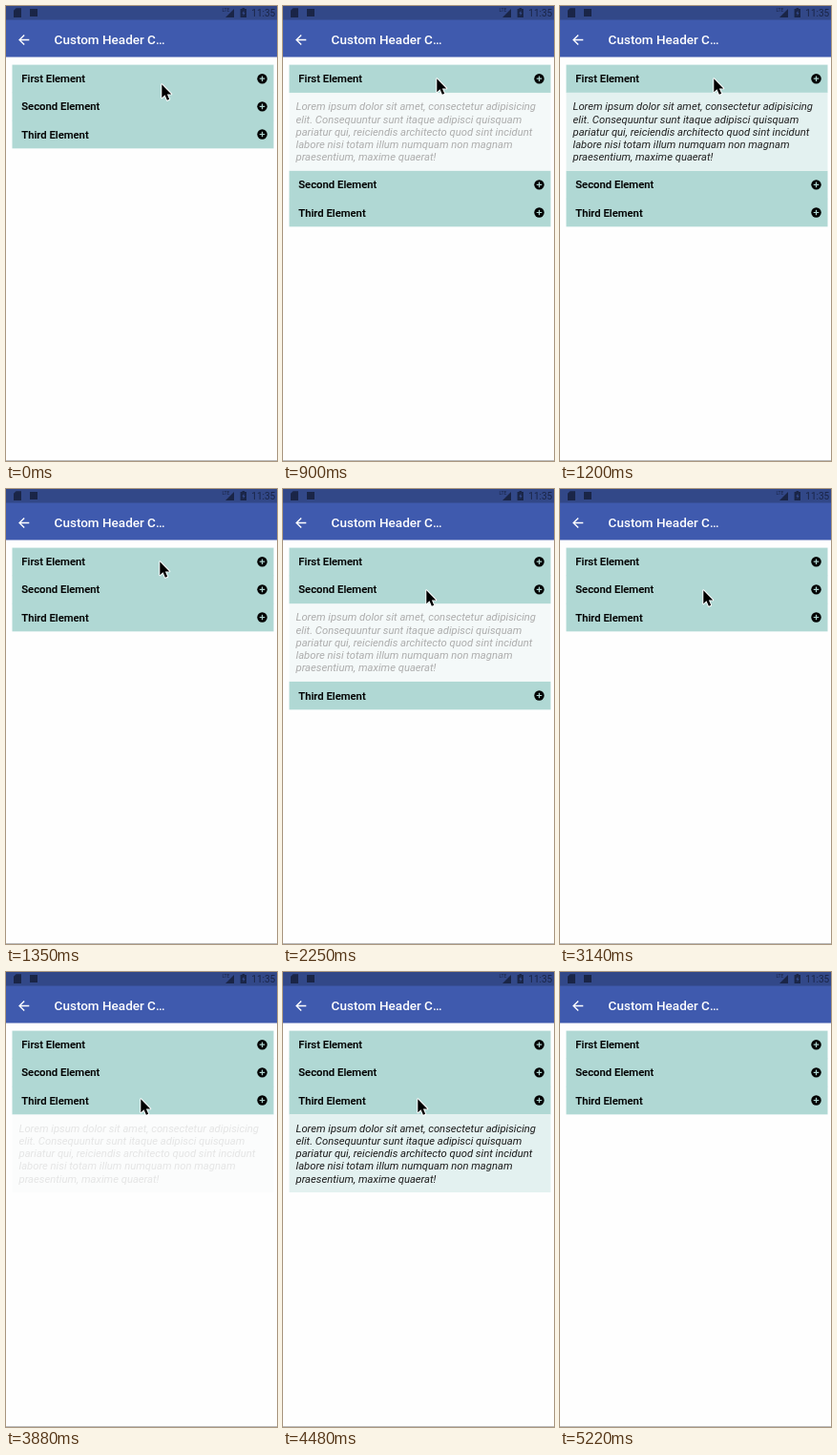
Animation, 284 px wide and 477 px high, one loop 6.41 s. Source, as an HTML page:

```html
<!DOCTYPE html>
<html lang="en">
<head>
<meta charset="utf-8">
<title>Accordion with custom header</title>
<style>
  html, body { margin: 0; width: 100%; height: 100%; overflow: hidden; background: #fefefe; }
  svg { display: block; width: 284px; height: 477px; font-family: Roboto, sans-serif; }
  .title { font-size: 13.5px; font-weight: 500; fill: #fff; }
  .label { font-size: 11.3px; font-weight: 500; stroke: #000; stroke-width: .15px; }
  .body { font-size: 11.25px; font-style: italic; fill: #1c1c1c; }
  .status { fill: #1a2547; }
</style>
</head>
<body>
<svg viewBox="0 0 284 477">
  <rect width="284" height="477" fill="#fefefe"/>
  <rect y="476" width="284" height="1" fill="#bdbdbd"/>
  <rect width="284" height="53.5" fill="#3f5aae"/>
  <rect width="284" height="14.5" fill="#324888"/>

  <g class="status">
    <path d="M10.6 2.2H16V12H8V4.8z"/>
    <rect x="25" y="3" width="8" height="8"/>
    <text x="226.5" y="6" font-size="5">LTE</text>
    <path d="M239 3v9h-9z"/>
    <path d="M247.5 2h2.6v1.1H252V12h-6.4V3.1h1.900z"/>
    <path d="M249.400 4.500l-2 3.500h1.200v2.600l2-3.600h-1.200z" fill="#324888"/>
    <text x="257.300" y="11" font-size="10">11:35</text>
  </g>

  <path transform="translate(10.300 27.100) scale(.7)" fill="#fff"
    d="M20 11H7.830l5.590-5.590L12 4l-8 8 8 8 1.410-1.410L7.830 13H20z"/>
  <text class="title" x="50.600" y="39.900">Custom Header C…</text>

  <g id="rows"></g>
  <g id="panel">
    <rect x="6.500" width="274" height="82" fill="#e3f1f0"/>
    <g id="copy" class="body"></g>
  </g>
  <path id="cursor" stroke="#fff" stroke-width="1.800" stroke-linejoin="round" paint-order="stroke"
    d="M1.300 1.200V15.300L4.500 12.300 6.900 17.800 9.200 16.800 6.900 11.400H11.300z"/>
</svg>
<script>
const LOOP = 6410, TICK = 150, FADE = 600;
const TOP = 61.6, ROW = 29.15, PANEL = 82;
const labels = ["First Element", "Second Element", "Third Element"];
const lines = [
  "Lorem ipsum dolor sit amet, consectetur adipisicing",
  "elit. Consequuntur sunt itaque adipisci quisquam",
  "pariatur qui, reiciendis architecto quod sint incidunt",
  "labore nisi totam illum numquam non magnam",
  "praesentium, maxime quaerat!"
];

// One visit per row; lead is how far the fade has run when the panel appears.
const visits = [
  { open: 900, close: 1350, lead: 240 },
  { open: 2250, close: 3140, lead: 240 },
  { open: 3880, close: 4780, lead: 120 }
];
// Where the pointer comes to rest, and when; it is gone at the last stop.
const stops = [
  { t: 0, x: 162, y: 81 },
  { t: 600, x: 160, y: 75 },
  { t: 1950, x: 149, y: 105 },
  { t: 3590, x: 140, y: 132 },
  { t: 5220, x: 143, y: 132 }
];

const $ = id => document.getElementById(id);
const move = (el, x, y) => el.setAttribute("transform", `translate(${x} ${y})`);
const mix = (a, b, k) => a + (b - a) * k;
const smooth = k => k * k * (3 - 2 * k);

$("copy").innerHTML = lines.map((s, i) =>
  `<text x="13.5" y="${18.6 + i * 13.25}">${s}</text>`).join("");
$("rows").innerHTML = labels.map(s => `<g>
  <rect x="6.5" width="274" height="${ROW + .3}" fill="#b0d8d4"/>
  <text class="label" x="16.3" y="18.7">${s}</text>
  <circle cx="268.5" cy="14.6" r="5.2"/>
  <path d="M265.7 14.6h5.6M268.5 11.8v5.6" stroke="#b0d8d4" stroke-width="1.2"/>
</g>`).join("");
const rows = [...$("rows").children];

function drawRows(t) {
  const open = visits.findIndex(v => t >= v.open && t < v.close);
  rows.forEach((row, i) =>
    move(row, 0, TOP + i * ROW + (open >= 0 && i > open ? PANEL : 0)));
  $("panel").style.display = open < 0 ? "none" : "";
  if (open < 0) return;
  const { open: start, lead } = visits[open];
  const elapsed = lead + Math.floor((t - start) / TICK) * TICK;
  $("panel").setAttribute("opacity", smooth(Math.min(1, elapsed / FADE)));
  move($("panel"), 0, TOP + (open + 1) * ROW);
}

// A move takes two ticks: two thirds of the way, then the rest.
function drawCursor(t) {
  const next = stops.find(s => s.t > t);
  $("cursor").style.display = next ? "" : "none";
  if (!next) return;
  const last = stops[stops.indexOf(next) - 1];
  const k = t >= next.t - TICK ? 2 / 3 : 0;
  move($("cursor"), mix(last.x, next.x, k), mix(last.y, next.y, k));
}

function draw(now) {
  const t = now % LOOP;
  drawRows(t);
  drawCursor(t);
  requestAnimationFrame(draw);
}
draw(0);
</script>
</body>
</html>
```
